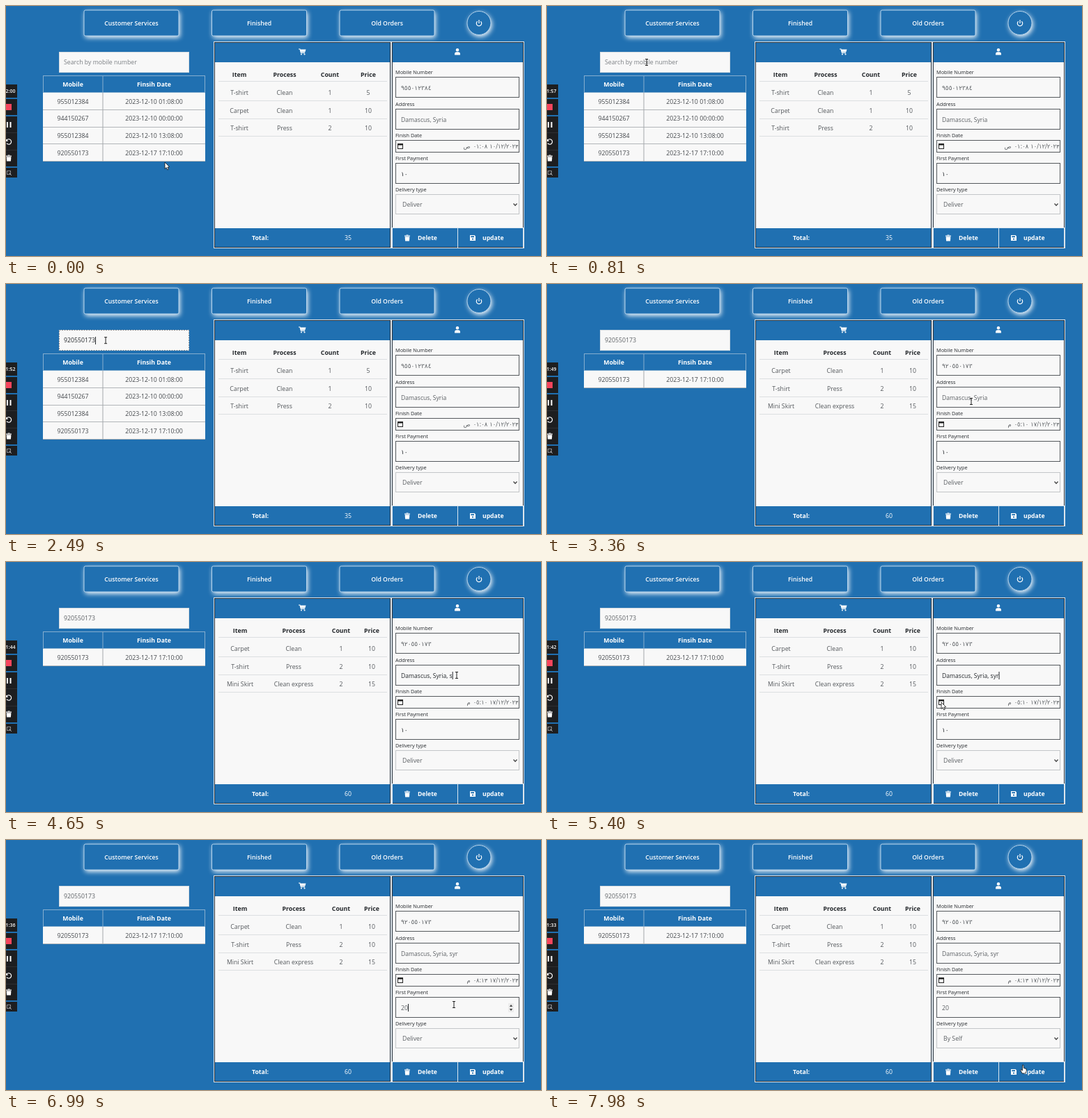
Recreate the animation shown at these times as an HTML page with a canvas. Size 768 px wide and 360 px high, loop 8 s.

```html
<!DOCTYPE html>
<html lang="en">
<head>
<meta charset="utf-8">
<title>Laundry orders</title>
<style>
html, body { margin: 0; width: 100%; height: 100%; overflow: hidden; background: #2070b1; }
canvas { display: block; width: 768px; height: 360px; }
</style>
</head>
<body>
<canvas id="stage"></canvas>
<script>
const W = 768, H = 360, LOOP = 8000;
const BLUE = '#2070b1', PAPER = '#f8f8f8', INK = '#24282c', SOFT = '#5c6064', PICK = '#0b74f5';
const LATIN = '"Open Sans", "Noto Sans", sans-serif';
const ARABIC = '"DejaVu Sans", sans-serif';
const PHONES = ['955012384', '944150267', '955012384', '920550173'];
const DATES = ['2023-12-10 01:08:00', '2023-12-10 00:00:00', '2023-12-10 13:08:00', '2023-12-17 17:10:00'];
const ORDERS = [
  { cols: [335, 400, 465, 520], total: 35, rows: [['T-shirt', 'Clean', 1, 5], ['Carpet', 'Clean', 1, 10], ['T-shirt', 'Press', 2, 10]] },
  { cols: [336, 413, 481, 525], total: 60, rows: [['Carpet', 'Clean', 1, 10], ['T-shirt', 'Press', 2, 10], ['Mini Skirt', 'Clean express', 2, 15]] }
];
// Pointer stops: time, x, y
const PATH = [
  [0, 228, 225], [250, 228, 225], [800, 143, 81], [2480, 143, 81], [2800, 170, 138], [2980, 170, 138],
  [3360, 609, 169], [3700, 647, 163], [5100, 647, 163], [5380, 566, 202], [5520, 566, 202],
  [5830, 662, 113], [5980, 660, 113], [6200, 688, 112], [6350, 688, 112], [6600, 643, 237],
  [7120, 643, 237], [7330, 640, 286], [7550, 636, 284], [7880, 684, 330], [8000, 684, 330]
];

const canvas = document.getElementById('stage');
const g = canvas.getContext('2d');
const dpr = window.devicePixelRatio || 1;
canvas.width = W * dpr;
canvas.height = H * dpr;

const arabic = v => String(v).replace(/\d/g, d => String.fromCharCode(0x660 + +d));
const pad = n => arabic(String(n).padStart(2, '0'));

function text(s, x, y, { size = 8.75, weight = 400, color = INK, align = 'center', font = LATIN, dir = 'ltr' } = {}) {
  g.font = `${weight} ${size}px ${font}`;
  g.fillStyle = color;
  g.textAlign = align;
  g.direction = dir;
  g.fillText(s, x, y + size * 0.357);
  return g.measureText(s).width;
}

function box(x, y, w, h, fill, stroke, dash = []) {
  if (fill) { g.fillStyle = fill; g.fillRect(x, y, w, h); }
  if (stroke) {
    g.strokeStyle = stroke;
    g.lineWidth = 1;
    g.setLineDash(dash);
    g.strokeRect(x + 0.5, y + 0.5, w - 1, h - 1);
    g.setLineDash([]);
  }
}

function line(points, color, width = 1) {
  g.beginPath();
  points.forEach(([x, y], i) => i ? g.lineTo(x, y) : g.moveTo(x, y));
  g.strokeStyle = color;
  g.lineWidth = width;
  g.stroke();
}

function poly(points, fill, stroke) {
  g.beginPath();
  points.forEach(([x, y]) => g.lineTo(x, y));
  g.closePath();
  g.fillStyle = fill;
  g.fill();
  if (stroke) { g.strokeStyle = stroke; g.lineWidth = 0.8; g.stroke(); }
}

function arc(x, y, r, from, to, color, width) {
  g.beginPath();
  g.arc(x, y, r, from, to);
  g.strokeStyle = color;
  g.lineWidth = width;
  g.stroke();
}

function dot(x, y, r, color) {
  g.beginPath();
  g.arc(x, y, r, 0, Math.PI * 2);
  g.fillStyle = color;
  g.fill();
}

function trash(x, y) {
  box(x - 4, y - 3.5, 8, 1.2, '#fff');
  box(x - 1.5, y - 4.5, 3, 1, '#fff');
  poly([[x - 3.4, y - 1.7], [x + 3.4, y - 1.7], [x + 2.9, y + 4.5], [x - 2.9, y + 4.5]], '#fff');
}

function glow(shape) {
  g.save();
  g.shadowColor = '#fff';
  g.shadowBlur = 7 * dpr;
  g.shadowOffsetX = 1.5 * dpr;
  g.shadowOffsetY = 2.5 * dpr;
  g.beginPath();
  shape();
  g.fillStyle = BLUE;
  g.fill();
  g.restore();
  g.strokeStyle = '#b4d3ec';
  g.lineWidth = 1;
  g.stroke();
}

function topBar() {
  [['Customer Services', 112], ['Finished', 295.5], ['Old Orders', 479]].forEach(([name, x]) => {
    glow(() => g.roundRect(x, 6, 136, 37, 2));
    text(name, x + 68, 24.5, { weight: 600, color: '#fff', size: 8.7 });
  });
  glow(() => g.arc(679, 24.5, 17, 0, Math.PI * 2));
  arc(679, 25, 3.7, -Math.PI * 0.28, Math.PI * 1.28, '#fff', 1.2);
  line([[679, 20], [679, 25]], '#fff', 1.2);
}

function recorder(t) {
  const secs = Math.round(120 - 3.4 * t / 1000);
  const dark = '#1d1e20';
  box(0, 113, 16, 19, dark);
  box(0, 134, 16, 23, dark);
  box(0, 159, 16, 72, dark);
  box(0, 233, 16, 14, dark);
  [182, 207].forEach(y => box(0, y, 16, 1, '#2e3033'));
  text(`${Math.floor(secs / 60)}:${String(secs % 60).padStart(2, '0')}`, 13.5, 122.5,
    { size: 7, weight: 600, color: '#fff', align: 'right' });
  box(0, 141, 8, 9, '#f5455c');
  box(1, 167, 2, 8, '#fff');
  box(5.5, 167, 2, 8, '#fff');
  arc(4, 195.5, 3.6, -Math.PI * 0.8, Math.PI * 0.8, '#fff', 1.2);
  poly([[-0.5, 191], [3.2, 194.5], [-0.5, 195]], '#fff');
  trash(4, 219);
  box(1, 237, 6, 6, null, '#8b8d90');
  line([[4, 240], [8, 244]], '#a5a7aa');
}

function searchBox(t, query) {
  const active = t > 850 && t < 2850;
  box(76, 66, 187, 30, PAPER, active ? '#8a8d90' : '#d5dce2', active ? [2, 1.5] : []);
  const w = text(query || 'Search by mobile number', 83, 81,
    { align: 'left', color: active && query ? INK : query ? SOFT : '#7b7f83' });
  if (active) box(83 + (query ? w : 0), 76, 1, 11, INK);
}

function customerTable(filtered) {
  const rows = filtered ? [3] : [0, 1, 2, 3];
  const bottom = 125 + rows.length * 24.75;
  const edge = '#86aecf';
  box(53, 100, 233, bottom - 100, PAPER);
  box(53, 100, 233, 25, BLUE, edge);
  line([[139, 100], [139, 125]], edge);
  text('Mobile', 96, 112.8, { weight: 700, color: '#fff' });
  text('Finsih Date', 212.5, 112.8, { weight: 700, color: '#fff' });
  rows.forEach((r, i) => {
    const y = 125 + i * 24.75;
    const rule = Math.round(y + 24.75) - 0.5;
    text(PHONES[r], 96, y + 12.6, { color: '#44484c' });
    text(DATES[r], 212.5, y + 12.6, { color: '#44484c' });
    line([[53, rule], [286, rule]], '#b2b6b9');
  });
  line([[139, 125], [139, bottom]], '#a4a8ab');
}

function panel(x, w) {
  box(x, 52, w, 296, PAPER);
  box(x, 52, w, 29, BLUE);
  box(x, 320, w, 28, BLUE);
  box(x, 52, w, 296, null, '#2b3540');
  box(x - 1, 51, w + 2, 298, null, '#dce4ea');
}

function orderPanel(order) {
  panel(299, 253);
  line([[420, 62], [422, 62], [423.5, 67.5], [429, 67.5]], '#fff', 1.1);
  poly([[422, 62.5], [430.5, 62.5], [429.3, 66.6], [423, 66.6]], '#fff');
  dot(424, 69.5, 1.1, '#fff');
  dot(428.5, 69.5, 1.1, '#fff');
  ['Item', 'Process', 'Count', 'Price'].forEach((s, i) => text(s, order.cols[i], 99.3, { weight: 700 }));
  order.rows.forEach((row, r) => row.forEach((s, i) =>
    text(String(s), order.cols[i], 125 + r * 25.5, { color: '#54585c' })));
  [108.5, 136.5, 162.5, 187.5].forEach(y => line([[305, y], [547, y]], '#dcdfe1'));
  text('Total:', 365, 334.3, { weight: 700, color: '#fff' });
  text(String(order.total), 491, 334.3, { color: '#fff' });
}

function field(label, y, h) {
  text(label, 559, y - 6.7, { size: 7.35, weight: 500, align: 'left' });
  box(559, y, 178, h, PAPER, label === 'Delivery type' ? '#c3c6c8' : '#55595d');
}

function dateField(s, editing) {
  const style = { size: 8.3, font: ARABIC, color: SOFT, align: 'right' };
  box(562, 199, 8, 7, null, '#222');
  box(562, 198, 8, 2.5, '#222');
  if (editing) box(692, 196, 10, 12, PICK);
  const day = pad(s.day), rest = `/${arabic(12)}/${arabic(2023)}`;
  const w = text(rest, 735.5, 202, style);
  const dw = text(day, 735.5 - w, 202, { ...style, color: editing ? '#fff' : SOFT });
  const end = 735.5 - w - dw - 3;
  const tw = text(`${pad(s.hour)}:${pad(s.minute)}`, end, 202, style);
  text(s.half, end - tw - 4, 202, style);
}

function customerPanel(s) {
  panel(554, 189);
  dot(648, 63.3, 2.2, '#fff');
  g.beginPath();
  g.roundRect(644, 66.3, 8, 4.2, [3, 3, 0.5, 0.5]);
  g.fill();
  field('Mobile Number', 102, 30);
  text(arabic(s.phone), 567, 117.5, { size: 9, font: ARABIC, color: SOFT, align: 'left' });

  field('Address', 148, 30);
  const aw = text(s.address, 567, 163.5, { size: 8.6, color: s.addressOn ? INK : SOFT, align: 'left' });
  if (s.addressOn) box(567 + aw, 158, 1, 11, INK);

  field('Finish Date', 193, 18);
  dateField(s, s.popup);

  field('First Payment', 226, 30);
  const local = s.payment === '10';
  const pw = text(local ? arabic(10) : s.payment, 567, 241.5,
    { size: local ? 9 : 8.75, font: local ? ARABIC : LATIN, color: local ? INK : SOFT, align: 'left' });
  if (s.paymentOn) {
    box(567 + pw, 236, 1, 11, INK);
    box(721, 235, 8, 13, '#ececec');
    poly([[722.8, 240], [725, 237], [727.2, 240]], '#444');
    poly([[722.8, 243], [725, 246], [727.2, 243]], '#444');
  }

  field('Delivery type', 271, 29);
  text(s.delivery, 569, 286, { color: SOFT, align: 'left' });
  line([[728.5, 284.5], [731, 287.2], [733.5, 284.5]], '#444', 1.3);

  box(554, 319, 95, 30, null, '#dce7f0');
  box(648, 319, 95, 30, null, '#dce7f0');
  trash(576, 334);
  text('Delete', 591, 334.3, { weight: 700, size: 8.6, color: '#fff', align: 'left' });
  poly([[666, 330], [672.5, 330], [674, 331.5], [674, 338], [666, 338]], '#fff');
  box(667.3, 331.2, 4.7, 2, BLUE);
  dot(670, 335.7, 1.1, BLUE);
  text('update', 684, 334.3, { weight: 700, size: 8.6, color: '#fff', align: 'left' });
}

function arrow(x, y, dir) {
  line([[x, y - 4.5], [x, y + 4.5]], '#333');
  line([[x - 4, y + dir * 0.5], [x, y + dir * 4.5], [x + 4, y + dir * 0.5]], '#333');
}

function picker(s, px, py) {
  const font = ARABIC;
  g.save();
  g.shadowColor = 'rgba(0,0,0,.4)';
  g.shadowBlur = 5 * dpr;
  g.shadowOffsetY = dpr;
  box(508, 29, 230, 164, PAPER);
  g.restore();
  arrow(522, 43, -1);
  arrow(541, 43, 1);
  text('كانون الأول, ' + arabic(2023), 629, 42.5, { size: 6, weight: 700, font, align: 'right', dir: 'rtl' });
  poly([[575.5, 41.5], [580.5, 41.5], [578, 44.3]], '#333');

  [...'سحنثرخج'].forEach((name, c) => text(name, 621 - c * 16.5, 64, { size: 6, font, color: SOFT }));
  for (let i = 0; i < 42; i++) {
    const n = i - 5, x = 621 - (i % 7) * 16.5, y = 80.5 + Math.floor(i / 7) * 16.3;
    const inMonth = n > 0 && n < 32;
    const day = n < 1 ? n + 30 : n > 31 ? n - 31 : n;
    const on = n === s.day;
    if (on) box(x - 8, y - 8, 16, 16, PICK, '#111');
    text(arabic(day), x, y, { size: 6, font, weight: on ? 700 : 400, color: on ? '#fff' : inMonth ? INK : '#777' });
  }
  text('اليوم', 615, 180.5, { size: 6, font, color: '#2065a8', dir: 'rtl' });
  text('محو', 528, 180.5, { size: 6, font, color: '#2065a8', dir: 'rtl' });

  const cycle = (start, first, span) => Array.from({ length: 7 }, (_, i) => pad((start - first + i) % span + first));
  [cycle(s.hour, 1, 12), cycle(s.minute, 0, 60), ['م', 'ص']].forEach((list, c) => {
    const x = 637.5 + c * 32.7;
    list.forEach((label, i) => {
      const y = 38 + i * 21;
      const over = px > x && px < x + 31 && py > y && py < y + 21;
      if (!i) box(x, y, 31, 21, PICK);
      else if (over) box(x, y, 31, 21, '#b0d0f5');
      text(label, x + 15.5, y + 10.5, { size: 6.5, font, color: i ? INK : '#fff', weight: i ? 400 : 700 });
    });
  });
}

function pointerAt(t) {
  const i = Math.max(1, PATH.findIndex(p => p[0] > t));
  const [t0, x0, y0] = PATH[i - 1], [t1, x1, y1] = PATH[i];
  const u = (t - t0) / (t1 - t0), e = u * u * (3 - 2 * u);
  return [x0 + (x1 - x0) * e, y0 + (y1 - y0) * e];
}

function pointer(x, y, popup) {
  const inside = (l, top, r, b) => x > l && x < r && y > top && y < b;
  const typing = !popup && (inside(76, 66, 263, 96) || inside(559, 102, 737, 132) ||
    inside(559, 148, 737, 178) || inside(559, 226, 720, 256));
  if (typing) {
    line([[x, y - 4.5], [x, y + 4.5]], '#222');
    line([[x - 2, y - 4.5], [x + 2, y - 4.5]], '#222');
    line([[x - 2, y + 4.5], [x + 2, y + 4.5]], '#222');
  } else if (inside(554, 320, 743, 348)) {
    poly([[-1.5, -6], [0, -6], [0.4, -1.5], [4, -0.5], [4.2, 2.5], [3, 6], [-2, 6], [-4.2, 1.5], [-3.6, 0.5], [-1.6, 2]]
      .map(([a, b]) => [x + a, y + b]), '#fff', '#111');
  } else {
    poly([[0, 0], [0, 9.5], [2.2, 7.6], [3.8, 11], [5.4, 10.2], [3.9, 7], [6.8, 6.8]]
      .map(([a, b]) => [x + a, y + b]), '#fff', '#111');
  }
}

function typed(s, t, start, step) {
  return s.slice(0, Math.max(0, Math.floor((t - start) / step)));
}

function stateAt(t) {
  const opened = t >= 2950;
  return {
    phone: PHONES[opened ? 3 : 0],
    address: 'Damascus, Syria' + typed(', syr', t, 4050, 190),
    addressOn: t >= 3750 && t < 5450,
    day: opened ? 17 : 10,
    hour: t >= 5960 ? 8 : opened ? 5 : 1,
    minute: t >= 6300 ? 13 : opened ? 10 : 8,
    half: opened ? 'م' : 'ص',
    popup: t >= 5500 && t < 6480,
    payment: t < 6680 ? '10' : typed('20', t, 6640, 120),
    paymentOn: t >= 6620 && t < 7250,
    delivery: t < 7520 ? 'Deliver' : 'By Self',
    order: ORDERS[opened ? 1 : 0]
  };
}

function draw(t) {
  const s = stateAt(t), [x, y] = pointerAt(t);
  g.setTransform(dpr, 0, 0, dpr, 0, 0);
  box(0, 0, W, H, BLUE);
  topBar();
  searchBox(t, typed(PHONES[3], t, 1120, 150));
  customerTable(t >= 2560);
  orderPanel(s.order);
  customerPanel(s);
  if (s.popup) picker(s, x, y);
  recorder(t);
  pointer(x, y, s.popup);
}

const began = performance.now();
function tick() {
  draw((performance.now() - began) % LOOP);
  requestAnimationFrame(tick);
}
tick();
</script>
</body>
</html>
```
